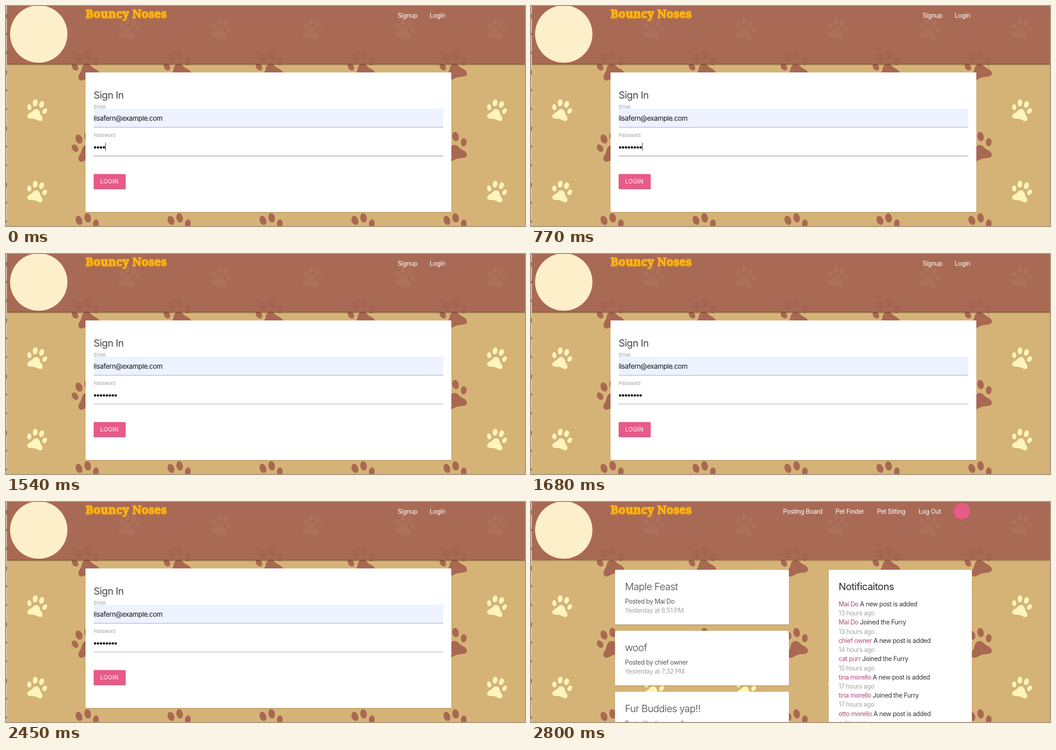
Recreate the animation shown at these times as an HTML page. Size 1149 by 487 pixels, loop 2870 ms.

```html
<!DOCTYPE html>
<html lang="en">
<head>
<meta charset="utf-8">
<title>Sign in</title>
<style>
  html, body { margin: 0; width: 100%; height: 100%; overflow: hidden; background: #d5b377; }
  svg { display: block; width: 1149px; height: 487px; font: 14px Inter, "Open Sans", sans-serif; }
  text { letter-spacing: -.03em; white-space: pre; }
  .brand { font: 900 25.5px "Noto Serif", serif; letter-spacing: .01em; stroke-width: 1.6; stroke-linejoin: round; }
  .nav { fill: #fff; }
  .card { fill: #fff; filter: drop-shadow(0 1px 1px rgba(70, 40, 20, .28)); }
  .title { font-size: 22px; fill: #47474b; }
  .light { font-weight: 300; }
  .label { font-size: 11px; fill: #a3a3a6; }
  .email { font-size: 15px; fill: #141416; }
  .by { fill: #56565a; }
  .time { fill: #a4a4a6; }
  .note { fill: #333338; }
  .who { fill: #ad4a7c; }
  .button { font-size: 12.6px; letter-spacing: .4px; fill: #fff; }
</style>
</head>
<body>
<svg id="stage" viewBox="0 0 1149 487">
  <defs>
    <g id="paw">
      <ellipse cx="-24" cy="-4" rx="6.3" ry="9" transform="rotate(-20 -24 -4)"/>
      <ellipse cx="-10" cy="-21" rx="7.2" ry="10.5" transform="rotate(-5 -10 -21)"/>
      <ellipse cx="10" cy="-21" rx="7.2" ry="10.5" transform="rotate(5 10 -21)"/>
      <ellipse cx="24" cy="-4" rx="6.3" ry="9" transform="rotate(20 24 -4)"/>
      <path d="M0-4C8-4 10 3 14 9C19 14 25 18 23 25C20 33 9 27 0 27C-9 27-20 33-23 25C-25 18-19 14-14 9C-10 3-8-4 0-4Z"/>
    </g>
    <linearGradient id="shade" x2="0" y2="1">
      <stop stop-color="#5a3618" stop-opacity=".6"/>
      <stop offset="1" stop-color="#5a3618" stop-opacity="0"/>
    </linearGradient>
  </defs>

  <rect width="1149" height="487" fill="#d5b377"/>
  <g id="paws"></g>

  <rect x="2" width="1147" height="129" fill="#a56351" fill-opacity=".9"/>
  <rect id="shadow" x="2" y="128" width="1147" height="4" fill="url(#shade)"/>
  <g id="edge"><rect width="1.5" height="487" fill="#d9d2c8"/></g>
  <circle cx="72.5" cy="62" r="63.5" fill="#fcefc9"/>
  <text class="brand" x="177" y="27.5" fill="#c5802b" stroke="#c5802b">Bouncy Noses</text>
  <text class="brand" x="176" y="26" fill="#fcb316" stroke="#fcb316">Bouncy Noses</text>

  <g id="login">
    <text class="nav" x="867" y="25.5">Signup</text>
    <text class="nav" x="938" y="25.5">Login</text>
    <rect class="card" x="176" y="147" width="810" height="309"/>
    <text class="title" x="194" y="205">Sign In</text>
    <text class="label" x="194" y="227">Email</text>
    <rect x="194" y="227" width="774" height="41" fill="#edf3fe"/>
    <text class="email" x="194" y="253.5">lisafern@example.com</text>
    <rect id="emailLine" x="194" y="268" width="774" height="1"/>
    <text class="label" x="194" y="290">Password</text>
    <g id="dots" fill="#111"></g>
    <rect id="caret" y="303" width="1" height="17" fill="#111"/>
    <rect id="passLine" x="194" y="331.5" width="774" height="1"/>
    <rect x="194" y="372.5" width="71" height="33" rx="2" fill="#bd486f"/>
    <rect x="194" y="372" width="71" height="32.5" rx="2" fill="#e85a88"/>
    <text class="button" x="208.5" y="393">LOGIN</text>
  </g>

  <g id="board">
    <text class="nav" x="558" y="25.5">Posting Board</text>
    <text class="nav" x="674" y="25.5">Pet Finder</text>
    <text class="nav" x="766" y="25.5">Pet Sitting</text>
    <text class="nav" x="858" y="25.5">Log Out</text>
    <circle cx="954" cy="22" r="18.6" fill="#8d4a45" fill-opacity=".6"/>
    <circle cx="954" cy="21" r="18.3" fill="#e85a88"/>
    <g id="posts"></g>
    <rect class="card" x="659" y="150" width="317" height="345" rx="1.5"/>
    <text class="title" x="681" y="195" style="fill:#2b2b30">Notificaitons</text>
    <g id="notes"></g>
  </g>
</svg>
<script>
const LOOP = 2870, SWAP = 2520, BLUR = 1190, FADE = 350;
const TYPED = [0, 0, 0, 0, 140, 280, 560, 700];
const NS = "http://www.w3.org/2000/svg";
const $ = id => document.getElementById(id);

function add(parent, tag, attrs, text) {
  const el = document.createElementNS(NS, tag);
  for (const k in attrs) el.setAttribute(k, attrs[k]);
  if (text) el.textContent = text;
  parent.appendChild(el);
  return el;
}

function paw(x, y, turn, size, fill) {
  add($("paws"), "use", {
    href: "#paw", fill,
    transform: `translate(${x} ${y}) rotate(${turn}) scale(${size})`
  });
}

for (let row = 0; row < 3; row++) {
  for (let col = 0; col < 6; col++) {
    const x = col * 203.6, y = row * 180;
    paw(68 + x, 231 + y - 180, 14, .73, "#fdf5bb");
    if (col < 5) paw(177 + x, 132 + y, -16, 1, "#a96851");
  }
}

// slivers of the window behind the page
for (let i = 0; i < 12; i++) {
  add($("edge"), "rect", { y: 18 + i * 41.5, width: 1.5, height: i % 3 ? 5 : 9, fill: "#55483f" });
}

const posts = [
  ["Maple Feast", "Mai Do", "Yesterday at 8:51 PM"],
  ["woof", "chief owner", "Yesterday at 7:32 PM"],
  ["Fur Buddies yap!!", "tina morello", "Yesterday at 6:15 PM"]
];
posts.forEach(([title, who, when], i) => {
  const y = 150 + i * 135, g = $("posts");
  add(g, "rect", { class: "card", x: 186, y, width: 385, height: 121, rx: 1.5 });
  add(g, "text", { class: "title light", x: 208, y: y + 45 }, title);
  add(g, "text", { class: "by", x: 208, y: y + 74.5 }, "Posted by " + who);
  add(g, "text", { class: "time", x: 208, y: y + 95 }, when);
});

const post = " A new post is added", join = " Joined the Furry";
const notes = [
  ["Mai Do", post, "13 hours ago"],
  ["Mai Do", join, "13 hours ago"],
  ["chief owner", post, "14 hours ago"],
  ["cat purr", join, "15 hours ago"],
  ["tina morello", post, "17 hours ago"],
  ["tina morello", join, "17 hours ago"],
  ["otto morello", post, "a day ago"]
];
notes.forEach(([who, what, when], i) => {
  const y = 231 + i * 40.45, g = $("notes");
  const line = add(g, "text", { class: "note", x: 681, y });
  add(line, "tspan", { class: "who" }, who);
  add(line, "tspan", {}, what);
  add(g, "text", { class: "time", x: 681, y: y + 20.2 }, when);
});

const dots = TYPED.map((_, i) =>
  add($("dots"), "circle", { cx: 197.3 + i * 6.5, cy: 313, r: 2.6 }));

const mix = (a, b, k) => `rgb(${a.map((v, i) => Math.round(v + (b[i] - v) * k))})`;
const show = (el, on) => { el.style.display = on ? "" : "none"; };

function draw(t) {
  const home = t >= SWAP;
  show($("login"), !home);
  show($("board"), home);
  $("shadow").style.opacity = home ? .55 : 1;

  const count = TYPED.filter(at => t >= at).length;
  dots.forEach((dot, i) => show(dot, i < count));
  $("caret").setAttribute("x", 194 + count * 6.5);
  show($("caret"), t < BLUR);

  const k = Math.min(1, Math.max(0, (t - BLUR) / FADE));
  $("passLine").style.fill = mix([142, 104, 120], [162, 158, 162], k);
  $("emailLine").style.fill = mix([178, 156, 170], [164, 160, 168], k);
}

const start = performance.now();
function tick() {
  draw((performance.now() - start) % LOOP);
  requestAnimationFrame(tick);
}
tick();
</script>
</body>
</html>
```
